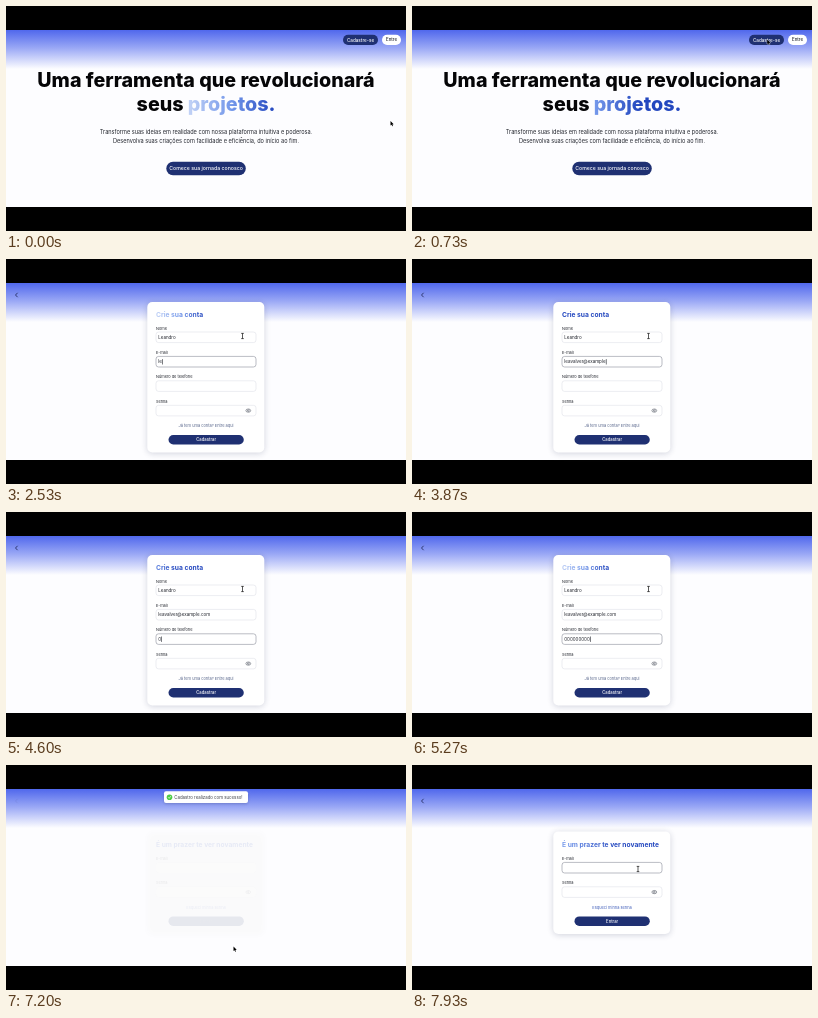
These frames come from a looping animation (400 by 225 pixels, 8000 ms). An HTML page with a canvas:

```html
<!DOCTYPE html>
<html lang="pt-BR">
<head>
<meta charset="utf-8">
<title>Cadastro</title>
<style>
  html, body { margin: 0; width: 100%; height: 100%; overflow: hidden; background: #000; }
  canvas { display: block; width: 400px; height: 225px; }
</style>
</head>
<body>
<canvas id="stage"></canvas>
<script>
const LOOP = 8000;
const SIGNUP_AT = 960, SUBMIT_AT = 7030, LOGIN_AT = 7130;
const NAVY = '#1f3072', BLUE = '#2347bf', LIGHT = '#c3d3f6', INK = '#22252d';

const canvas = document.getElementById('stage');
const ctx = canvas.getContext('2d');
const scale = window.devicePixelRatio || 1;
canvas.width = 400 * scale;
canvas.height = 225 * scale;

const ramp = (t, from, to) => Math.min(1, Math.max(0, (t - from) / (to - from)));
const smooth = p => p * p * (3 - 2 * p);
const mix = (a, b, p) => a + (b - a) * p;

const signupFields = [
  { label: 'Nome', y: 73, text: 'Leandro', from: 1760, to: 2240, focus: [1640, 2320] },
  { label: 'E-mail', y: 97.4, text: 'leavalver@example.com', from: 2350, to: 4200, focus: [2320, 4360] },
  { label: 'Número de telefone', y: 121.8, text: '00000000000', from: 4430, to: 5440, focus: [4360, 5560] },
  { label: 'Senha', y: 146.3, text: '••••••••••', from: 5650, to: 6380, focus: [5560, 6850], eye: true }
];
const loginFields = [
  { label: 'E-mail', y: 97.4, text: '', from: 0, to: 1, focus: [7750, LOOP], quiet: true },
  { label: 'Senha', y: 121.8, text: '', from: 0, to: 1, focus: [0, 0], eye: true }
];

// time, x, y of the pointer
const pointerPath = [
  [0, 384.5, 115], [130, 384.5, 115], [760, 355, 33], [940, 355, 33],
  [1330, 265.5, 70], [1620, 236.5, 77], [6420, 236.5, 77],
  [6850, 227.5, 181.5], [7260, 227.5, 181.5], [7740, 226, 104], [LOOP, 226, 104]
];

function setFont(size, weight = 400) {
  ctx.font = `${weight} ${size}px Inter, "Open Sans", sans-serif`;
}

function text(str, x, y, size, color, weight = 400, align = 'left') {
  setFont(size, weight);
  ctx.textAlign = align;
  ctx.fillStyle = color;
  ctx.fillText(str, x, y);
}

function box(x, y, w, h, r, fill, stroke) {
  ctx.beginPath();
  ctx.roundRect(x, y, w, h, r);
  if (fill) { ctx.fillStyle = fill; ctx.fill(); }
  if (stroke) { ctx.strokeStyle = stroke; ctx.lineWidth = 0.6; ctx.stroke(); }
}

function shadowBox(x, y, w, h, r, blur, alpha) {
  ctx.save();
  ctx.shadowColor = `rgba(30, 40, 80, ${alpha})`;
  ctx.shadowBlur = blur * scale;
  ctx.shadowOffsetY = scale;
  box(x, y, w, h, r, '#fff');
  ctx.restore();
}

function button(x, y, w, h, label, size, fill = NAVY, color = '#fff') {
  box(x, y, w, h, h / 2, fill);
  text(label, x + w / 2, y + h / 2 + size * 0.36, size, color, 500, 'center');
}

// Three-second shimmer: solid blue, then a light wash from the left, then back.
function shimmerText(str, x, y, size, weight, age) {
  setFont(size, weight);
  const width = ctx.measureText(str).width;
  const phase = (age % 3000 + 3000) % 3000 / 1500;
  const glow = smooth(phase < 1 ? phase : 2 - phase);
  const start = x - (1 - glow) * width;
  const fill = ctx.createLinearGradient(start, 0, start + width, 0);
  fill.addColorStop(0, LIGHT);
  fill.addColorStop(0.5, '#7397ea');
  fill.addColorStop(1, BLUE);
  text(str, x, y, size, fill, weight);
}

function background() {
  ctx.fillStyle = '#000';
  ctx.fillRect(0, 0, 400, 225);
  const sky = ctx.createLinearGradient(0, 24, 0, 63);
  sky.addColorStop(0, '#5068ec');
  sky.addColorStop(0.45, '#98a6f5');
  sky.addColorStop(1, '#fdfdff');
  ctx.fillStyle = sky;
  ctx.fillRect(0, 24, 400, 177);
}

function home(t) {
  const hover = smooth(ramp(t, 680, 800));
  button(337, 28.8, 35, 10.2, 'Cadastre-se', 4.6, hover > 0.5 ? '#2b3f8c' : NAVY);
  button(376, 28.8, 19, 10.2, 'Entre', 4.4, '#fff', INK);

  const size = 19.7, weight = 800;
  text('Uma ferramenta que revolucionará', 200, 81, size, '#050507', weight, 'center');
  const lead = 'seus ', word = 'projetos.';
  const leadWidth = ctx.measureText(lead).width;
  const x = 200 - (leadWidth + ctx.measureText(word).width) / 2;
  text(lead, x, 104.7, size, '#050507', weight);
  shimmerText(word, x + leadWidth, 104.7, size, weight, t + 1500);

  text('Transforme suas ideias em realidade com nossa plataforma intuitiva e poderosa.',
    200, 127.7, 5.6, INK, 400, 'center');
  text('Desenvolva suas criações com facilidade e eficiência, do início ao fim.',
    200, 137.2, 5.6, INK, 400, 'center');
  button(160.3, 155.8, 79.5, 13.4, 'Comece sua jornada conosco', 5.2);
}

function eye(x, y) {
  ctx.strokeStyle = '#555a66';
  ctx.lineWidth = 0.6;
  ctx.beginPath();
  ctx.ellipse(x, y, 2.4, 1.6, 0, 0, 7);
  ctx.stroke();
  ctx.beginPath();
  ctx.arc(x, y, 0.8, 0, 7);
  ctx.stroke();
}

function field(f, t) {
  const focused = t >= f.focus[0] && t < f.focus[1];
  text(f.label, 150, f.y - 2.5, 3.9, INK);
  box(150, f.y, 100, 10.6, 2.6, '#fff', focused ? '#8b8f9b' : '#dfe1e8');
  const typed = f.text.slice(0, Math.floor(f.text.length * ramp(t, f.from, f.to)));
  text(typed, 152.2, f.y + 7, 4.5, INK);
  if (focused && !f.quiet) {
    ctx.fillRect(152.5 + ctx.measureText(typed).width, f.y + 2.7, 0.6, 5.4);
  }
  if (f.eye) eye(242.3, f.y + 5.3);
}

function backArrow() {
  ctx.strokeStyle = '#1b2350';
  ctx.lineWidth = 0.8;
  ctx.beginPath();
  ctx.moveTo(11.6, 33.8);
  ctx.lineTo(9.5, 36);
  ctx.lineTo(11.6, 38.2);
  ctx.stroke();
}

function formPage(t, form) {
  backArrow();
  shadowBox(141.3, form.top, 117, form.height, 5, 6, 0.2);
  shimmerText(form.title, 150, form.top + 15.4, 6.7, 700, t - form.start);
  form.fields.forEach(f => field(f, t));
  const bottom = form.top + form.height;
  text(form.link, 200, bottom - 25.2, 3.95, form.linkColor, 400, 'center');
  button(162.5, bottom - 17.5, 75.3, 9.5, form.action, 4.2);
}

const signup = {
  top: 43, height: 150.5, start: SIGNUP_AT, title: 'Crie sua conta', fields: signupFields,
  link: 'Já tem uma conta? Entre aqui', linkColor: '#556389', action: 'Cadastrar'
};
const login = {
  top: 66.4, height: 102.5, start: LOGIN_AT, title: 'É um prazer te ver novamente', fields: loginFields,
  link: 'Esqueci minha senha', linkColor: '#3d5bb8', action: 'Entrar'
};

function toast(t) {
  const shown = smooth(ramp(t, 7020, 7150)) * (1 - smooth(ramp(t, 7640, 7780)));
  if (!shown) return;
  ctx.save();
  ctx.beginPath();
  ctx.rect(0, 24, 400, 177);
  ctx.clip();
  ctx.globalAlpha *= shown;
  ctx.translate(0, mix(-14, 0, shown));
  shadowBox(158, 26.3, 84, 11.8, 2, 3, 0.25);
  ctx.fillStyle = '#4ccb45';
  ctx.beginPath();
  ctx.arc(163.5, 32.2, 2.8, 0, 7);
  ctx.fill();
  ctx.strokeStyle = '#fff';
  ctx.lineWidth = 0.7;
  ctx.beginPath();
  ctx.moveTo(162.2, 32.3);
  ctx.lineTo(163.2, 33.3);
  ctx.lineTo(164.8, 31.2);
  ctx.stroke();
  text('Cadastro realizado com sucesso!', 168.3, 33.8, 4.35, '#3c3f46');
  ctx.restore();
}

function pointer(t, fields) {
  const next = Math.max(1, pointerPath.findIndex(p => p[0] > t));
  const [t0, x0, y0] = pointerPath[next - 1], [t1, x1, y1] = pointerPath[next];
  const p = smooth(ramp(t, t0, t1));
  const x = mix(x0, x1, p), y = mix(y0, y1, p);
  const overField = fields.some(f => x > 150 && x < 250 && y > f.y && y < f.y + 10.6);
  ctx.beginPath();
  if (overField) {
    ctx.strokeStyle = '#111';
    ctx.lineWidth = 0.7;
    for (const end of [-2.6, 2.6]) {
      ctx.moveTo(x - 1.3, y + end);
      ctx.lineTo(x + 1.3, y + end);
    }
    ctx.moveTo(x, y - 2.6);
    ctx.lineTo(x, y + 2.6);
    ctx.stroke();
    return;
  }
  const outline = [[0, 0], [0, 4.6], [1, 3.7], [1.8, 5.3], [2.5, 5], [1.8, 3.4], [3.2, 3.3]];
  outline.forEach(([dx, dy]) => ctx.lineTo(x + dx, y + dy));
  ctx.closePath();
  ctx.strokeStyle = '#fff';
  ctx.lineWidth = 0.6;
  ctx.stroke();
  ctx.fillStyle = '#000';
  ctx.fill();
}

function withAlpha(alpha, draw) {
  if (alpha <= 0) return;
  ctx.save();
  ctx.globalAlpha = alpha;
  draw();
  ctx.restore();
}

function render(t) {
  ctx.setTransform(scale, 0, 0, scale, 0, 0);
  background();
  if (t < SIGNUP_AT) {
    home(t);
  } else if (t < LOGIN_AT) {
    const alpha = smooth(ramp(t, SIGNUP_AT, 1240)) * (1 - smooth(ramp(t, SUBMIT_AT, LOGIN_AT)));
    withAlpha(alpha, () => formPage(t, signup));
  } else {
    withAlpha(smooth(ramp(t, LOGIN_AT, 7510)), () => formPage(t, login));
  }
  toast(t);
  pointer(t, t < SIGNUP_AT ? [] : t < LOGIN_AT ? signupFields : loginFields);
}

function tick() {
  render(performance.now() % LOOP);
  requestAnimationFrame(tick);
}
tick();
</script>
</body>
</html>
```
